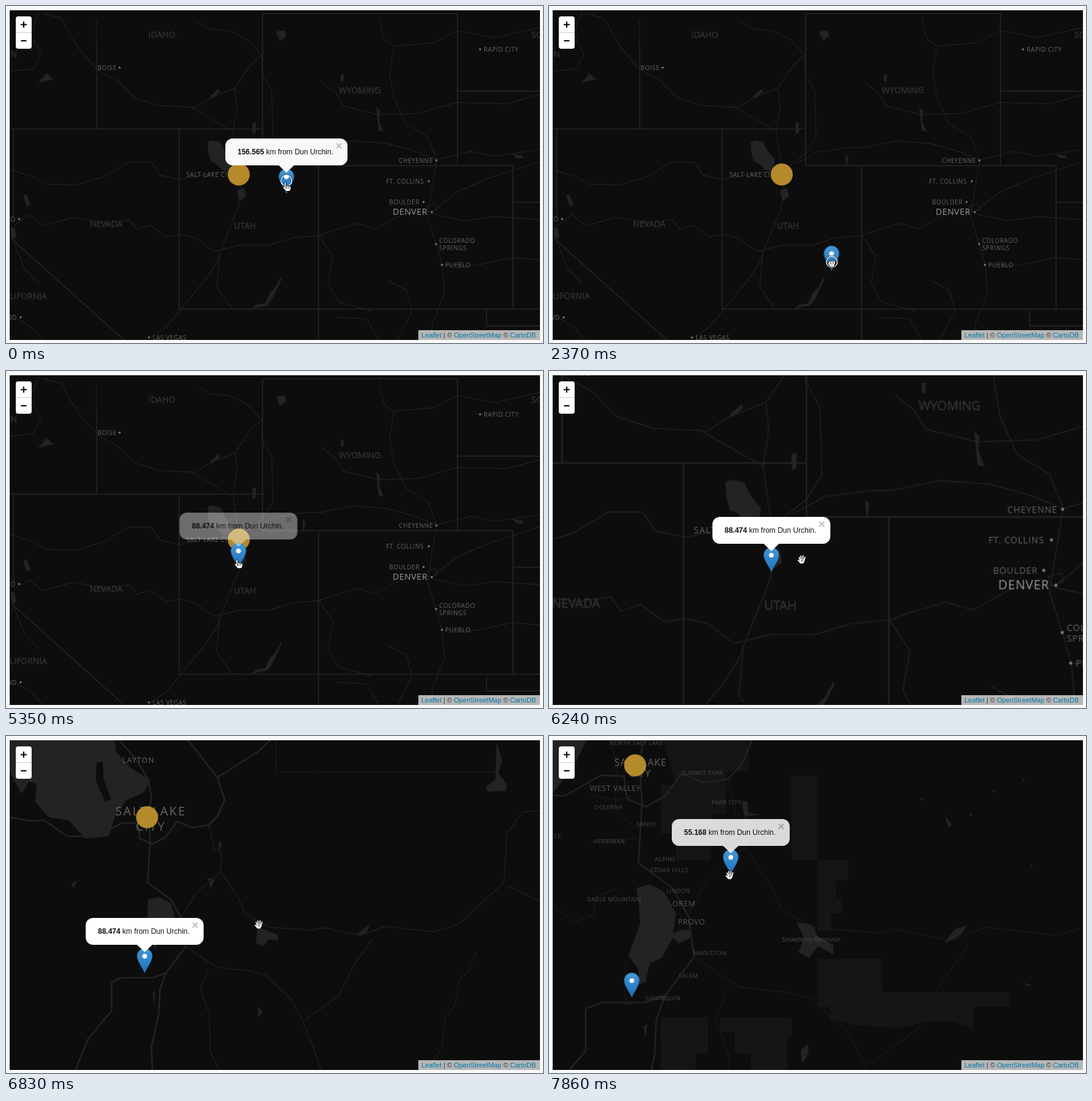
Recreate the animation shown at these times as an HTML page. Size 879 px wide and 552 px high, loop 8000 ms.

```html
<!DOCTYPE html>
<html lang="en">
<head>
<meta charset="utf-8">
<title>Distance map</title>
<style>
html, body { margin: 0; width: 100%; height: 100%; overflow: hidden; background: #f9f9f9; }
svg { display: block; }
.ui { font: 12px "Liberation Sans", Arial, sans-serif; }
.map { font: 10px "Open Sans", sans-serif; letter-spacing: .6px; fill: #656565; }
.border, .road, .highway, .dot { fill: none; stroke-linejoin: round; }
.border { stroke: #272727; stroke-width: 1.5; }
.road { stroke: var(--road, #1f1f1f); stroke-width: var(--thin, 1.4px); }
.highway { stroke: var(--highway); stroke-width: var(--wide); }
.steady { vector-effect: non-scaling-stroke; }
.land { fill: #0d0d0d; }
.water { fill: #232323; }
.forest { fill: #151515; }
.dot { stroke: #777; stroke-width: 3.6; stroke-linecap: round; }
.state { font-size: 14px; letter-spacing: 0; fill: #323232; stroke: #323232; stroke-width: .4; text-anchor: middle; }
.end { text-anchor: end; }
.mid { text-anchor: middle; }
#far { transform-origin: 417px 309px; }
#near { transform-origin: 416px 309px; --highway: #232323; --wide: 2.6px; --road: #1b1b1b; --thin: 2px; }
#close {
  font-size: 9.8px; letter-spacing: .3px; fill: #484848;
  --highway: #222; --wide: 2.6px; --road: #1a1a1a; --thin: 1.4px;
}
.town { font-size: 12.4px; letter-spacing: .6px; fill: #565656; }

#far, #near, #close, #place, #pin, #pin2, #cursor, .popup, #ring, #point, #fist, #open {
  animation: 8s step-end infinite;
}
#near, #close, #pin2, .popup, #fist, #open { opacity: 0; }
#far { animation-name: far; }
#near { animation-name: near; }
#close { animation-name: close; }
#place { animation-name: place; }
#pin { animation-name: pin; }
#pin2 { animation-name: pin2; }
#cursor { animation-name: cursor; }
#ring { animation-name: ring; }
#point { animation-name: point; }
#fist { animation-name: fist; }
#open { animation-name: open; }
#popup1 { animation-name: popup1; }
#popup2 { animation-name: popup2; }
#popup3 { animation-name: popup3; }
#popup4 { animation-name: popup4; }
#popup5 { animation-name: popup5; }

@keyframes far {
  0% { transform: scale(1); opacity: 1; }
  78% { transform: scale(1.474); opacity: 1; }
  79.875% { transform: scale(2); opacity: 1; }
  81.75% { transform: scale(2.8); opacity: 1; }
  83.625%, 100% { transform: scale(4); opacity: 0; }
}
@keyframes near {
  0% { opacity: 0; }
  83.625% { opacity: 1; transform: scale(.733); }
  85.375% { opacity: 1; transform: scale(1); }
  87.25%, 100% { opacity: 1; transform: scale(1.465); }
}
@keyframes close {
  0% { opacity: 0; }
  89% { opacity: .5; }
  90.875%, 100% { opacity: 1; }
}
@keyframes place {
  0% { transform: translate(381px, 276px); }
  78% { transform: translate(365px, 261px); }
  79.875% { transform: translate(347px, 244px); }
  81.75% { transform: translate(320px, 218px); }
  83.625% { transform: translate(279px, 179px); }
  85.375% { transform: translate(231px, 133px); }
  87.25%, 100% { transform: translate(141px, 48px); }
}
@keyframes pin {
  0% { transform: translate(459px, 307px); }
  3.75% { transform: translate(459px, 319px); }
  5.6% { transform: translate(459px, 345px); }
  7.375% { transform: translate(459.5px, 364px); }
  9.25% { transform: translate(460px, 369px); }
  27.75% { transform: translate(461px, 405px); }
  29.625% { transform: translate(462.5px, 433px); }
  50.125% { transform: translate(433.5px, 398px); }
  52% { transform: translate(403px, 347px); }
  53.75% { transform: translate(386px, 326px); }
  55.625% { transform: translate(381px, 323px); }
  57.5% { transform: translate(380.5px, 322px); }
  78% { transform: translate(364px, 329px); }
  79.875% { transform: translate(346px, 338px); }
  81.75% { transform: translate(318px, 350px); }
  83.625% { transform: translate(276px, 368px); }
  85.375% { transform: translate(227px, 388px); }
  87.25%, 100% { transform: translate(135.5px, 428px); }
}
@keyframes pin2 { 0% { opacity: 0; } 96.375%, 100% { opacity: 1; } }
@keyframes cursor {
  0% { transform: translate(459px, 286px); }
  3.75% { transform: translate(459px, 300px); }
  5.6% { transform: translate(459px, 327px); }
  7.375% { transform: translate(460px, 345px); }
  9.25% { transform: translate(460px, 350px); }
  27.75% { transform: translate(462px, 391px); }
  29.625% { transform: translate(463px, 419px); }
  48.25% { transform: translate(461px, 416px); }
  50.125% { transform: translate(409px, 360px); }
  52% { transform: translate(389px, 320px); }
  53.75% { transform: translate(381px, 308px); }
  55.625% { transform: translate(380px, 306px); }
  70.625% { transform: translate(389px, 305px); }
  72.375% { transform: translate(407px, 308px); }
  74.25% { transform: translate(414px, 309px); }
  92.625%, 100% { transform: translate(296px, 228px); }
}
@keyframes ring {
  0%, 26%, 48.25% { opacity: 1; }
  18.5%, 40.875%, 66.875%, 100% { opacity: 0; }
}
@keyframes point {
  0%, 18.5%, 40.875%, 66.875% { opacity: 1; }
  1.875%, 26%, 48.25%, 72.375%, 100% { opacity: 0; }
}
@keyframes fist {
  1.875%, 26%, 48.25% { opacity: 1; }
  0%, 18.5%, 40.875%, 66.875%, 100% { opacity: 0; }
}
@keyframes open { 0% { opacity: 0; } 72.375%, 100% { opacity: 1; } }
@keyframes popup1 { 0% { opacity: .98; } 1.875% { opacity: .5; } 3.75%, 100% { opacity: 0; } }
@keyframes popup2 {
  18.5% { opacity: .4; } 20.375% { opacity: 1; } 26% { opacity: .5; } 27.75%, 100% { opacity: 0; }
}
@keyframes popup3 {
  40.875% { opacity: .4; } 42.75% { opacity: 1; } 48.25% { opacity: .5; } 50.125%, 100% { opacity: 0; }
}
@keyframes popup4 {
  66.875% { opacity: .4; } 68.75% { opacity: 1; } 96.375% { opacity: .4; } 98.25%, 100% { opacity: 0; }
}
@keyframes popup5 { 96.375% { opacity: .4; } 98.25%, 100% { opacity: .85; } }
</style>
</head>
<body>
<svg width="879" height="552" viewBox="0 0 879 552">
<defs>
  <clipPath id="frame"><path d="M6 7h868v540H6z"/></clipPath>
  <linearGradient id="blue" x2="0" y2="1">
    <stop stop-color="#4499d6"/><stop offset="1" stop-color="#1b70bd"/>
  </linearGradient>
  <g id="marker">
    <path d="M0 0C-3-8-12.3-19-12.3-27.8a12.3 12.3 0 0 1 24.6 0C12.3-19 3-8 0 0z" fill="url(#blue)" stroke="#2a6da6" stroke-width=".8"/>
    <circle cy="-27.3" r="4.4" fill="#fff" stroke="#2a6da6" stroke-width=".7"/>
  </g>
  <path id="pointShape" d="M-2 4v9M1 9v4M3.500 9.500v4M6 10.500v3M-4.500 11l4 5h5l1.500-3M0 14h4"/>
  <path id="fistShape" d="M-4 0v3M-1.300-1v4M1.300-1v4M4-.5v4M-5 3l3 4h4l2-4M-2 4.500h4"/>
  <path id="openShape" d="M-4.500-3.500l2 5.500M-1.700-6l.5 7M1.700-6l-.3 7M5-4l-2 6.500M-6 1l4 4.500h3.500l2-3M-2 3.500h4"/>
  <g id="valleyRoads">
    <path class="highway steady" d="M186 7L214 40 232 70 238 100 233 130 236 170 232 240 270 268 288 300 294 345 262 388 252 415 250 455 238 510 240 560M6 133L40 139 62 138 100 164 150 165 190 142 216 143 219 168 240 177 262 165 280 140 305 150 332 146 347 130 358 105 346 68 415 24 440 0M346 68L298 7M262 388L240 396 190 396 173 403 173 450 135 495 108 560"/>
    <path class="road steady" d="M332 146L341 185 352 190 351 222 380 265 392 292 430 313 500 318 520 314 580 327 620 312 700 321 740 309 815 240 820 160 845 125 874 122 930 125M352 222L310 258 288 296M600 332L570 375 545 425 490 465M294 345L345 379 400 385 425 392 466 430 485 465 505 515 520 560M332 380L318 415 333 455 334 515 350 550M820 245L874 270 930 268"/>
  </g>
</defs>

<g clip-path="url(#frame)">
  <path class="land" d="M6 7h868v540H6z"/>

  <g id="far" class="map">
    <path class="road" d="M6 107L45 103 57 78 40 45 55 7M60 12L90 20 108 52 121 72 150 105 182 122 210 150 250 163 310 166 335 150 375 134 400 97 419 80M375 134L378 165 372 205 378 250 386 285 380 330 360 380 350 405 345 420 325 450 300 480 284 500 262 526 235 544M300 164L345 190 372 205M310 24L335 38 365 40 395 55 419 80 419 110 435 140 437 215 420 242 384 270M6 268L40 278 66 292 115 293 160 280 200 256 238 256 252 277 285 284 330 275 380 268M405 258L440 239 463 236 490 232 514 232 568 221 623 225 670 238 705 252 760 238 800 246 874 235M12 360L38 342 60 360 110 346 165 356 202 350 214 366 236 359 262 378 285 374 310 380 340 402 382 392 430 392 470 380 512 376 535 368 575 356 605 365 650 340 697 337 738 305 790 282 874 255M610 16L619 55 635 66 628 110 635 150 654 192 690 214 705 252 697 300 690 345 704 390 714 424 718 470 698 520 696 547M518 126L540 143 552 164 610 178 675 176 738 158 820 160 874 145M635 66L700 60 739 40 800 52 874 35M696 340L750 352 800 345 874 350M714 424L770 425 830 412 874 416M512 376L535 410 527 455 545 485 600 500M540 510L590 512 610 547M625 450L655 465 665 500 640 547M12 384L30 430 55 455M350 405L345 460 370 496M148 24L148 68M6 505L40 525 60 547"/>
    <path class="border" d="M148.500 65V201M6 201.500H420M12.500 201V345M12 384L193 547M283.500 201V497M283 496.500H874M511.500 261V547M420 261.500H830M420 261V12.500H739V261M739 139.500H874M830 261V496M830 321.500H874M786.500 496V524H874"/>
    <path class="water" d="M330 223L337 220 351 223 358 238 370 252 366 269 354 269 344 258 335 254 331 240zM378 302L390 298 393 312 382 320zM403 192L409 190 409 207 404 210zM398 499L410 489 424 487 432 470 440 462 450 444 451 448 442 466 437 478 427 491 412 493zM52 126L60 118 66 110 78 120 64 123zM28 310L34 309 40 325 34 329zM7 363L14 362 17 378 10 384zM334 148L348 136 350 140 338 151zM442 42L456 40 459 50 448 57zM606 165L612 172 611 188 618 206 610 204zM548 112L553 112 552 125 548 123zM485 242L490 248 487 266zM828 242L845 245 848 250 836 249z"/>
    <path class="road" d="M688 328L703 324 706 333 693 338z"/>
    <path class="dot" d="M186 101h0M776 71h0M704.500 253h0M692 287h0M683.500 321h0M697 337.500h0M704 390h0M713.500 424h0M234 543h0M24 510h0M21.500 349h0"/>
    <g class="state">
      <text x="255" y="52">IDAHO</text><text x="579" y="143">WYOMING</text>
      <text x="164" y="362">NEVADA</text><text x="391" y="365">UTAH</text>
      <text x="67" y="480" class="end">CALIFORNIA</text><text x="18" y="84" class="end">OREGON</text>
      <text x="860" y="52" style="text-anchor:start">SOUTH DAKOTA</text>
    </g>
    <text x="150" y="104.500">BOISE</text><text x="782" y="75">RAPID CITY</text>
    <text x="643" y="257">CHEYENNE</text><text x="622" y="290.500">FT. COLLINS</text>
    <text x="627" y="324.500">BOULDER</text>
    <text x="633" y="342" font-size="14" fill="#989898">DENVER</text>
    <text x="709" y="388">COLORADO</text><text x="709" y="400">SPRINGS</text>
    <text x="719" y="427.500">PUEBLO</text><text x="240" y="546.500">LAS VEGAS</text>
    <text x="295" y="279.500">SALT LAKE CITY</text>
    <text x="18" y="514" class="end">FRESNO</text><text x="16" y="353" class="end">RENO</text>
  </g>

  <g id="near" class="map">
    <path class="land" d="M-200-150H1100V800H-200z"/>
    <path class="water" d="M6 58L25 95 38 75 50 78 48 108 70 133 102 138 130 168 168 164 178 133 196 106 226 92 236 72 204 52 180 26 174-30H-20zM232 268L250 264 270 274 276 296 258 312 244 350 232 320zM412 313L426 318 445 326 446 335 430 333 422 344 409 340zM803 10L812 40 806 60 820 80 818 90 788 91 785 84 801 72zM572 326L595 309 590 324zM106 243L116 236 111 249zM240 420L244 418 242 442zM412 444L420 450 414 462zM330 232L342 235 335 250zM348 170L354 180 348 188z"/>
    <path class="land" d="M148 44L158 42 160 72 172 103 162 108 147 72z"/>
    <path class="border" d="M442-60V58.500H805" stroke-dasharray="2.500 2.500"/>
    <use href="#valleyRoads"/>
    <path class="road" d="M770 354L757 385 742 400 735 440 718 465 714 510 690 547" stroke-dasharray="5 3"/>
    <text x="217" y="44" class="mid" font-size="12" letter-spacing="1.400">LAYTON</text>
    <g class="mid" font-size="20" style="letter-spacing:2.200px">
      <text x="237" y="130">SALT LAKE</text><text x="237" y="155">CITY</text>
    </g>
  </g>

  <g id="close" class="map">
    <path class="land" d="M6 7h868v540H6z"/>
    <path class="forest" d="M187 7H327V58H290V128H265V204H208V160H183V80H208zM395 65H440V204H398zM440 204H490V236H470V265H480V290H462V320H440zM440 365H545V420H753V444H695V480L660 468H610L580 478 500 474 460 464V444H440zM183 460H260V520H240V547H183zM280 460H397V490H390V547H330V520H304V485H280z"/>
    <path class="water" d="M6 7H62L40 50 6 94zM143 249L165 243 188 255 208 290 203 323 216 317 230 318 232 330 213 340 203 330 184 364 165 372 158 403 148 406 146 382 130 360 149 308 147 272zM405 305L431 309 440 328 465 342 466 358 440 344 426 364 408 354 418 332zM648 336L665 316 685 310 674 326 652 338zM315 106L325 108 326 125 345 129 320 132zM412 514L424 504 425 520 414 537zM155 475L161 472 158 495zM648 130L660 146 653 149zM726 88l5 2-3 5zM776 70l4 3-4 3zM610 100l3 4-5 2zM690 126l3 4-5 1zM790 210l3 4-5 1zM774 404L788 407 784 410z"/>
    <use href="#valleyRoads" transform="translate(416 309) scale(1.465) translate(-416 -309)"/>
    <path class="road" d="M6 275L40 306 72 293 78 262 112 250M125 370V440L150 437M65 95L110 105 140 98M80 170L140 168M100 7L112 50 108 120 140 150"/>
    <g class="mid" font-size="16" fill="#606060" style="letter-spacing:1px">
      <text x="150" y="49">SALT LAKE</text><text x="149" y="67">CITY</text>
    </g>
    <g class="town">
      <text x="67" y="90">WEST VALLEY</text><text x="202" y="279">OREM</text><text x="211" y="309">PROVO</text>
    </g>
    <text x="99" y="15">NORTH SALT LAKE</text><text x="217" y="64">SUMMIT PARK</text>
    <text x="266" y="112">PARK CITY</text><text x="74" y="119.500">OQUIRRH</text>
    <text x="143" y="147.500">SANDY</text><text x="72" y="175.500">HERRIMAN</text>
    <text x="173" y="204.500">ALPINE</text><text x="166" y="223">CEDAR HILLS</text>
    <text x="192" y="257">LINDON</text><text x="63" y="271">EAGLE MOUNTAIN</text>
    <text x="236" y="358.500">MAPLETON</text><text x="212" y="395.500">SALEM</text>
    <text x="158" y="432.500">SANTAQUIN</text><text x="20" y="167" class="end">TOOELE</text>
    <text x="381" y="337" font-size="10.500" font-style="italic" style="letter-spacing:0">Strawberry Reservoir</text>
  </g>

  <g class="ui">
    <circle id="place" r="18" fill="#b58a2b"/>
    <g id="pin"><use href="#marker"/></g>
    <g id="pin2"><use href="#marker" x="297.500" y="226"/></g>
    <g id="last" transform="translate(297.500 226)"></g>
  </g>

  <g class="ui">
    <path d="M675 531h199v16H675z" fill="#fff" opacity=".7"/>
    <text x="680" y="543" font-size="11" fill="#0078a8">Leaflet<tspan fill="#333"> | © </tspan>OpenStreetMap<tspan fill="#333"> © </tspan>CartoDB</text>
  </g>
  <rect x="16" y="17" width="26" height="53" rx="4" fill="#fff"/>
  <path d="M16 43.500h26" stroke="#ccc"/>
  <path d="M24 30.500h10M29 25.500v10M24.500 57h9" stroke="#000" stroke-width="2"/>

  <g id="cursor" stroke-linecap="round" stroke-linejoin="round">
    <g id="ring" fill="none">
      <circle r="10" stroke="#111" stroke-width="1"/>
      <circle r="9" stroke="#fff" stroke-width="1.300"/>
    </g>
  </g>
</g>
</svg>
<script>
const get = id => document.getElementById(id);

function addPopup(parent, id, width, km) {
  const half = width / 2;
  get(parent).insertAdjacentHTML('beforeend', `
    <g id="${id}" class="popup">
      <rect x="${-half}" y="-90" width="${width}" height="44" rx="12" fill="#fff"/>
      <path d="M-13-46.500H13L0-34z" fill="#fff"/>
      <text x="${20 - half}" y="-64" fill="#111"><tspan font-weight="bold">${km}</tspan> km from Dun Urchin.</text>
      <path d="M${half - 18}-82l8 8m0-8l-8 8" stroke="#c3c3c3" stroke-width="2.4"/>
    </g>`);
}

addPopup('pin', 'popup1', 200, '156.565');
addPopup('pin', 'popup2', 200, '229.922');
addPopup('pin', 'popup3', 200, '338.114');
addPopup('pin', 'popup4', 193, '88.474');
addPopup('last', 'popup5', 193, '55.168');

for (const hand of ['point', 'fist', 'open']) {
  get('cursor').insertAdjacentHTML('beforeend', `
    <g id="${hand}" fill="none">
      <use href="#${hand}Shape" stroke="#000" stroke-width="3.6"/>
      <use href="#${hand}Shape" stroke="#fff" stroke-width="1.9"/>
    </g>`);
}
</script>
</body>
</html>
```
